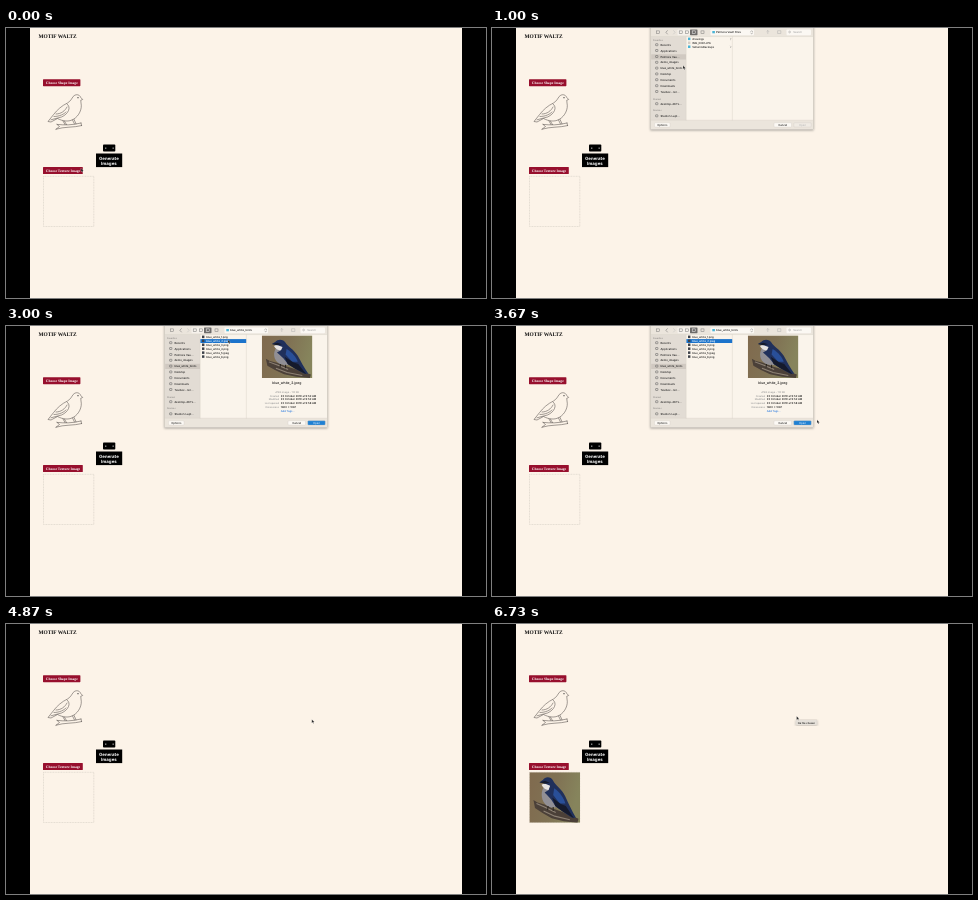
An HTML page that plays this animation: 480x270 px, repeating every 7070 ms.

```html
<!DOCTYPE html>
<html lang="en">
<head>
<meta charset="utf-8">
<title>Image picker</title>
<style>
  html, body { margin: 0; width: 100%; height: 100%; overflow: hidden; background: #000; }
  svg { display: block; }
  #stage { width: 100vw; height: 100vh; }
  text { font-family: Inter, "Liberation Sans", Arial, sans-serif; text-rendering: geometricPrecision; }
  #dialog text, #tooltip text { font-weight: 500; }
  .serif { font-family: "Liberation Serif", Times, serif; font-weight: bold; }
</style>
</head>
<body>
<svg id="stage" viewBox="0 0 480 270"></svg>
<script>
const LOOP = 7070, TICK = 1000 / 15;
const stage = document.getElementById('stage');

const rect = (x, y, w, h, fill, extra = '') =>
  `<rect x="${x}" y="${y}" width="${w}" height="${h}" fill="${fill}" ${extra}/>`;
const text = (x, y, size, str, fill = '#222', extra = '') =>
  `<text x="${x}" y="${y}" font-size="${size}" fill="${fill}" ${extra}>${str}</text>`;
const line = (d, color = '#666', width = .5) =>
  `<path d="${d}" fill="none" stroke="${color}" stroke-width="${width}" stroke-linecap="round" stroke-linejoin="round"/>`;
const group = (id, body) => `<g id="${id}">${body}</g>`;
const mid = 'text-anchor="middle"';

const photo = (x, y, w, h) => `
  <svg x="${x}" y="${y}" width="${w}" height="${h}" viewBox="0 0 100 100" preserveAspectRatio="none">
    <rect width="100" height="100" fill="url(#field)"/>
    <path d="M8 55L16 60 30 64 46 72 66 79 97 92 95 100 68 97 44 91 26 81 11 71Z" fill="#4b4038"/>
    <path d="M14 62L32 70 52 80M28 77L50 87 80 94" stroke="#8d8174" stroke-width="2.2" fill="none"/>
    <path d="M27 32C22 44 24 57 33 65 42 72 53 71 57 66L48 40 38 30Z" fill="#918f95"/>
    <path d="M24 25C28 35 38 38 49 34L46 26 32 21Z" fill="#e6e3e2"/>
    <path d="M20 20L27 15C31 8 43 8 47 17 50 25 64 33 71 48 77 61 84 77 92 90L84 90 67 79 52 68 43 54 34 44 30 40 38 35 41 27 29 22Z" fill="#20305b"/>
    <path d="M49 32C60 40 68 51 71 62L60 62 47 45Z" fill="#294f98"/>
    <path d="M45 50L62 63 72 67 88 91 66 78 51 67Z" fill="#151a2c"/>
    <path d="M20 20L31 17 40 21 30 23Z" fill="#141a2b"/>
    <path d="M37 67L36 75M47 69L47 77" stroke="#28231f" stroke-width="2"/>
  </svg>`;

const redButton = (y, w, label) =>
  rect(37, y, w, 7, '#970f2d', 'rx=".6"') + text(39.8, y + 4.7, 3.6, label, '#fff', 'class="serif"');

const sketch = line(`M76.4 71.2L74.7 69.4C73.5 66.3 69.5 65.8 67.2 68.5 65.6 70.6 64.8 73 61.5 75
    56 77.5 51 82 47.6 86.5L42 93.5 45 94 51.5 90.5C57 93.4 63 94 67.5 91.2 73 88 76.4 81 75 75L74.8 72.6Z
    M61 76C65.5 79 62.5 86 55.5 89L45 91.8M50 86C55 86 59 83 61 79M48 88.5C54 88.5 58 86 60 84
    M57 93L59 96.5M58.5 93.2L60.5 96.6M66.5 92L68.5 96M68 91.4L70 95.8
    M51 96.4C58 97.2 66 97.3 75 95M50 101.2C58 98.5 68 99.7 75.6 97.6M50 101.2L53.5 98.5 51 96.4M75 95L75.6 97.6`,
    '#443f3c', .5) + '<circle cx="72" cy="69.7" r=".6" fill="#222"/>';

const page = rect(24, 0, 432, 270, '#fcf3e8')
  + text(32.4, 9.6, 5.4, 'MOTIF WALTZ', '#111', 'class="serif"')
  + redButton(51.2, 37.4, 'Choose Shape Image') + sketch
  + redButton(139, 39.8, 'Choose Texture Image')
  + rect(97, 116.6, 12.3, 7, '#000', 'rx=".8"')
  + rect(99.2, 119.6, 1.1, 1.1, '#ddd') + rect(106.6, 119.6, 1.1, 1.1, '#ddd')
  + rect(90, 125.5, 26.2, 13.6, '#000')
  + text(102.9, 131.8, 4.4, 'Generate', '#fff', mid + ' font-weight="bold"')
  + text(102.9, 136.8, 4.4, 'Images', '#fff', mid + ' font-weight="bold"')
  + rect(37.5, 148.3, 50.3, 50.2, 'none', 'stroke="#cbc4ba" stroke-width=".5" stroke-dasharray="1 .6"')
  + group('result', photo(37.4, 148.2, 50.6, 50.5));

const sidebar = [
  [12.6, 'Favorites'], [17.8, 'Recents'], [23.6, 'Applications'], [29.6, 'Pelmora Vau…'],
  [35.4, 'demo_images'], [41.2, 'blue_white_birds'], [47, 'Desktop'], [52.8, 'Documents'],
  [58.8, 'Downloads'], [64.6, 'Tavibox - Un…'], [71.6, 'Shared'], [76.8, 'desktop-4KTL…'],
  [83.4, 'Devices'], [88.9, 'Studio’s Lapt…']
].map(([y, name]) => /^(Favorites|Shared|Devices)$/.test(name)
  ? text(161, y, 2.25, name, '#8b8885')
  : rect(163.6, y - 2.1, 2.3, 2, 'none', 'stroke="#555" stroke-width=".5" rx=".4"')
    + text(168.4, y, 2.75, name)).join('');

const rowY = i => 11.9 + i * 3.95;
const fileRow = (name, i, icon, color = '#222') =>
  rect(196, rowY(i) - 2.3, 2.4, 2.5, icon) + text(200.2, rowY(i), 2.7, name, color);

const cloudList = fileRow('drawings', 0, '#49b4d6') + fileRow('IMG_0081.JPG', 1, '#d5cec5')
  + fileRow('VellumixBackups', 2, '#49b4d6')
  + [0, 2].map(i => line(`M238.4 ${rowY(i) - 1.7}l.8 .8-.8 .8`, '#777', .4)).join('');
const birdList = ['png', 'jpeg', 'png', 'png', 'jpeg', 'png']
  .map((ext, i) => fileRow(`blue_white_${i + 1}.${ext}`, i, '#3c4149')).join('');

const details = [
  ['Created', '22 October 2019 at 9:52 AM'], ['Modified', '22 October 2019 at 9:52 AM'],
  ['Last opened', '22 October 2019 at 9:58 AM'], ['Dimensions', '1600 × 1067']
].map(([label, value], i) => {
  const y = 70.6 + i * 3.7;
  return text(273, y, 2.45, label, '#999', 'text-anchor="end"') + text(274.8, y, 2.65, value, '#1a1a1a');
}).join('');

const preview = photo(255.8, 9.4, 50.6, 42.6)
  + text(280.8, 57.6, 3.4, 'blue_white_2.jpeg', '#111', mid)
  + text(281, 66.6, 2.45, 'JPEG image - 112 KB', '#999', mid) + details
  + text(274.8, 85.6, 2.6, 'Add Tags…', '#2c7be0');

const pushButton = (x, w, label, fill, color) =>
  rect(x, 94.8, w, 4.2, fill, 'rx=".8" stroke="#c4bfb8" stroke-width=".25"')
  + text(x + w / 2, 97.9, 2.75, label, color, mid);

const toolbar = rect(164.3, 2.9, 3, 2.8, 'none', 'stroke="#777" stroke-width=".5"')
  + line('M175.4 2.6l-1.5 1.7 1.5 1.7', '#666') + line('M181.6 2.6l1.5 1.7-1.5 1.7', '#bbb')
  + rect(185.5, 1.4, 20, 5.8, '#f6f2ec', 'rx=".9"') + rect(198, 1.4, 7.5, 5.8, '#6d6b69', 'rx=".6"')
  + [187.2, 193.6, 200.2, 209].map((x, i) =>
      rect(x, 2.9, 3, 2.8, 'none', `stroke="${i === 2 ? '#fff' : '#777'}" stroke-width=".5"`)).join('')
  + rect(218.5, 1.4, 43.5, 5.8, '#fbf8f3', 'rx=".9"') + rect(220.3, 3, 2.6, 2.3, '#49b4d6')
  + line('M258.8 3.6l.9-.9.9.9M258.8 5l.9.9.9-.9', '#555', .4)
  + line('M275.8 5.5v-2.8M274.8 3.5l1-1 1 1M286 2.7h2.8v2.8h-2.8z', '#aaa', .45)
  + rect(294.5, 1.4, 24.5, 5.8, '#fbf8f3', 'rx=".9"')
  + '<circle cx="297.6" cy="4" r=".9" fill="none" stroke="#888" stroke-width=".4"/>'
  + text(301.2, 5.4, 2.7, 'Search', '#aaa');

const dialog = rect(158.6, -8, 162.8, 109.3, '#ebe5dc', 'filter="url(#shadow)" stroke="#bdb8b2" stroke-width=".4"')
  + rect(159, 8.6, 35.2, 83.6, '#e2dcd4')
  + rect(194.2, 8.6, 126.8, 83.6, '#faf4eb')
  + line('M159 8.6H321M159 92.2H321M194.2 8.6V92.2M240.4 8.6V92.2', '#d5cec5', .4)
  + toolbar
  + group('cloudView', rect(159.2, 26.3, 34.8, 5.2, '#d0c9c1') + text(224, 5.4, 2.75, 'Pelmora Vault Files') + cloudList)
  + group('birdView', rect(159.2, 37.8, 34.8, 5.2, '#d0c9c1') + text(224, 5.4, 2.75, 'blue_white_birds') + birdList
    + group('selection', rect(194.4, 13.1, 45.8, 3.9, '#1b73cb') + fileRow('blue_white_2.jpeg', 1, '#3c4149', '#fff')))
  + sidebar
  + group('preview', preview)
  + pushButton(162.5, 15.5, 'Options', '#fcf9f4', '#222')
  + pushButton(282, 17.5, 'Cancel', '#fcf9f4', '#222')
  + pushButton(301.8, 17.4, 'Open', '#f0ebe4', '#bbb')
  + group('openReady', pushButton(301.8, 17.4, 'Open', '#1f80d3', '#d5e8fa'));

stage.innerHTML = `<defs>
    <linearGradient id="field" x2="1" y2=".25">
      <stop stop-color="#806a4e"/><stop offset=".55" stop-color="#807254"/><stop offset="1" stop-color="#86845c"/>
    </linearGradient>
    <filter id="shadow" x="-10%" y="-10%" width="120%" height="120%">
      <feDropShadow dx="0" dy=".8" stdDeviation="1" flood-opacity=".35"/>
    </filter>
  </defs>`
  + page + group('dialog', dialog)
  + group('tooltip', rect(304, 95.9, 21, 5.2, '#e6e1da', 'filter="url(#shadow)" stroke="#c9c3bb" stroke-width=".25"')
    + text(305.8, 99.5, 2.5, 'No file chosen', '#111'))
  + group('cursor', '<path d="M0 0V3.5L.85 2.8 1.45 4.1 2.05 3.8 1.5 2.6H2.6Z" fill="#111" stroke="#fff" stroke-width=".25"/>')
  + rect(0, 0, 24, 270, '#000') + rect(456, 0, 24, 270, '#000');

const part = Object.fromEntries([...stage.querySelectorAll('g[id]')].map(g => [g.id, g]));
const show = (id, on) => part[id].setAttribute('display', on ? 'inline' : 'none');
const move = (id, x, y) => part[id].setAttribute('transform', `translate(${x} ${y})`);
const progress = (t, from, to) => Math.min(1, Math.max(0, (t - from) / (to - from)));

// Pointer stops: time, x, y
const path = [
  [0, 75, 140.3], [70, 75, 140.3], [600, 205, 18], [800, 205, 18], [1000, 191, 37.6],
  [1270, 186, 40.5], [1530, 186, 40.5], [2200, 222, 13.8], [3000, 222, 13.8], [3400, 327.5, 97],
  [3670, 325, 93.8], [4130, 305.8, 95.4], [5000, 305.8, 95.4], [5670, 304.6, 92.2], [LOOP, 304.6, 92.2]
];

function pointerAt(t) {
  const i = Math.max(1, path.findIndex(p => p[0] > t));
  const [t0, x0, y0] = path[i - 1], [t1, x1, y1] = path[i];
  const p = progress(t, t0, t1), k = p * p * (3 - 2 * p);
  return [x0 + (x1 - x0) * k, y0 + (y1 - y0) * k];
}

function render(time) {
  const t = Math.floor((time % LOOP + 4) / TICK) * TICK;
  const opening = 1 - (1 - progress(t, 130, 470)) ** 2;
  const closing = progress(t, 4325, 4620) ** 2;
  const inFolder = t >= 1590;

  show('dialog', opening > 0 && closing < 1);
  move('dialog', 0, -106 * (1 - opening + closing));
  show('cloudView', !inFolder);
  show('birdView', inFolder);
  show('selection', t >= 2450);
  show('preview', t >= 2590);
  show('openReady', t >= 2450);
  show('result', t >= 4930);
  show('tooltip', t >= 5990);
  move('cursor', ...pointerAt(t));
}

function loop() {
  render(performance.now());
  requestAnimationFrame(loop);
}
loop();
</script>
</body>
</html>
```
